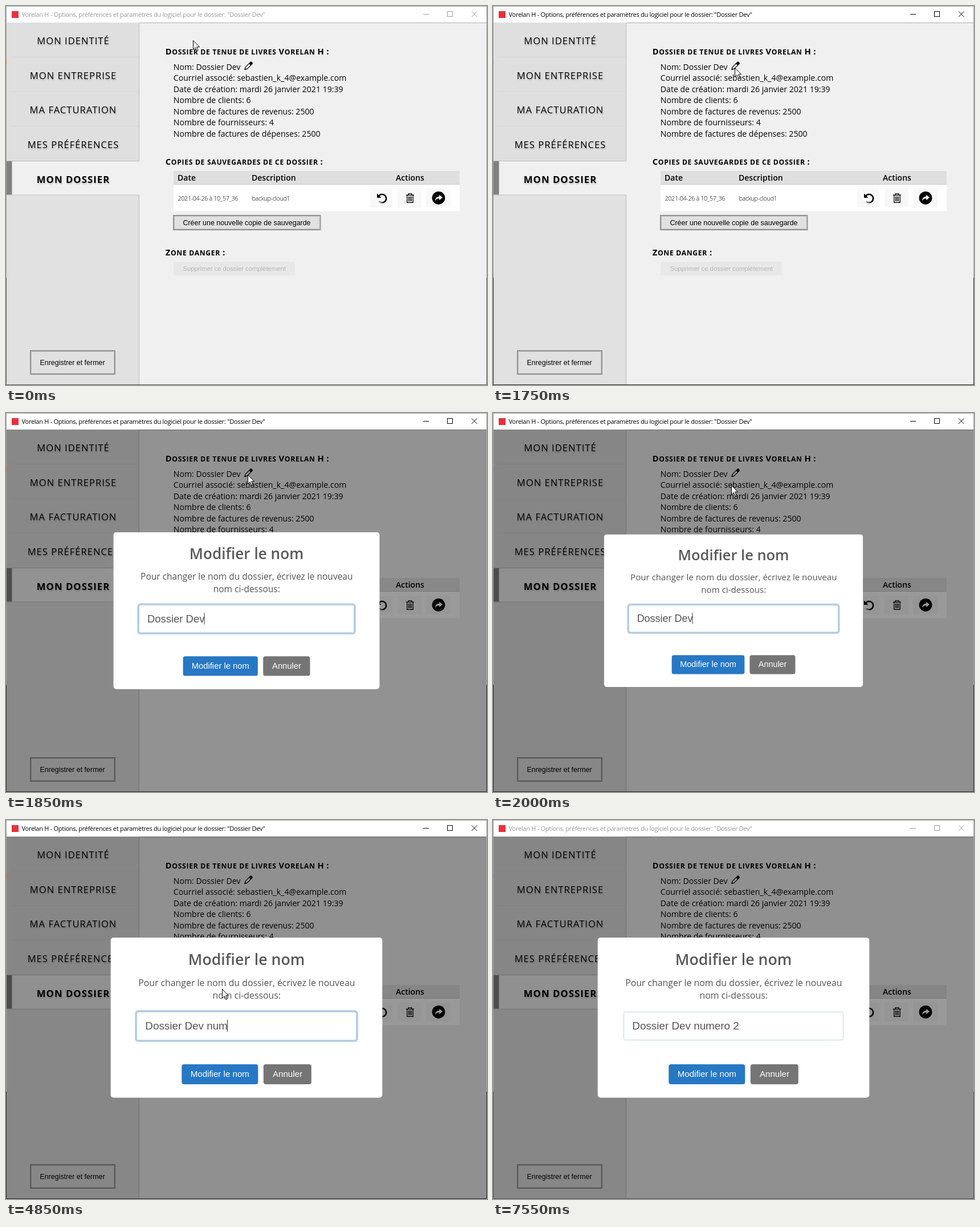
These frames come from a looping animation (844x664 px, 7.6 s). An HTML page:

```html
<!DOCTYPE html>
<html lang="fr">
<head>
<meta charset="utf-8">
<title>Options du dossier</title>
<style>
html, body { margin: 0; width: 100%; height: 100%; overflow: hidden; background: #f0f0f0; }
svg { display: block; }
text { font-family: "Open Sans", "Noto Sans", sans-serif; fill: #000; }
.bar { font-size: 11px; letter-spacing: -.27px; fill: var(--ink); }
.ctl { stroke: var(--ink); fill: none; }
.nav text { font-size: 16.6px; letter-spacing: 1px; text-anchor: middle; filter: drop-shadow(1px 2px 1px #0003); }
.nav .on { font-size: 16.8px; font-weight: 700; }
.head { font-size: 12.2px; font-weight: 700; letter-spacing: .67px; text-transform: uppercase; }
.cap { font-size: 14.8px; }
.info { font-size: 14.1px; }
.th { font-size: 14px; font-weight: 600; }
.td { font-size: 10.8px; font-weight: 300; letter-spacing: -.37px; }
.btn, .off, .ok, .field { font-family: "Liberation Sans", Arial, sans-serif; }
.btn { font-size: 12.44px; }
.off { font-size: 11.28px; fill: #b6b6b6; }
.ok { font-size: 15.1px; fill: #fff; text-anchor: middle; }
.field { font-size: 18.85px; fill: #545454; white-space: pre; }
.ask { font-size: 15.85px; fill: #545454; text-anchor: middle; }
.ttl { font-size: 26.7px; font-weight: 600; fill: #595959; text-anchor: middle; }
#modal { transform-origin: 422px 346.5px; }
</style>
</head>
<body>
<svg id="stage" width="844" height="664" viewBox="0 0 844 664">
  <defs>
    <linearGradient id="fade" gradientUnits="userSpaceOnUse" x1="653" y1="345" x2="660" y2="340">
      <stop offset="0" stop-color="#000" stop-opacity=".1"/><stop offset="1"/>
    </linearGradient>
  </defs>

  <!-- window and title bar -->
  <rect width="844" height="664" fill="#f0f0f0"/>
  <rect width="844" height="29" fill="#fff"/>
  <rect x="10" y="9" width="12" height="12" fill="#e8303c"/>
  <text class="bar" x="27.5" y="18.5">Vorelan H - Options, préférences et paramètres du logiciel pour le dossier: "Dossier Dev"</text>
  <path class="ctl" d="M732 14.5H742M774.5 9.5H783.5V18.5H774.5ZM817 9.5L826.5 19M826.5 9.5L817 19"/>

  <!-- side menu -->
  <rect x="1" y="29" width="232" height="634" fill="#e1e1e1"/>
  <rect x="1" y="29" width="232" height="242" fill="#dfdfdf"/>
  <path d="M8 89.5H232M8 150H232M8 210.5H232" stroke="#d5d5d5"/>
  <path d="M233.5 30V271.5H1M1 331H233.5V663" fill="none" stroke="#b9b9b9"/>
  <path d="M234 29.5H843" stroke="#acacac"/>
  <rect x="1" y="272" width="234" height="58.5" fill="#f0f0f0"/>
  <rect x="1" y="272" width="9.5" height="58.5" fill="#808080"/>
  <g class="nav">
    <text x="118" y="67">MON IDENTITÉ</text>
    <text x="118" y="127.5">MON ENTREPRISE</text>
    <text x="118" y="188">MA FACTURATION</text>
    <text x="118" y="248.5">MES PRÉFÉRENCES</text>
    <text class="on" x="118" y="310">MON DOSSIER</text>
  </g>
  <rect x="43" y="604" width="148" height="41" fill="#e1e1e1" stroke="#939393" stroke-width="2"/>
  <rect x="44.5" y="605.5" width="145" height="38" fill="none" stroke="#c4c4c4"/>
  <text class="btn" x="59.5" y="628.5">Enregistrer et fermer</text>

  <!-- folder page -->
  <g id="page"></g>
  <path d="M418.9 111.4L420.1 107.1 428.6 98.6Q429.8 97.4 431 98.6L431.7 99.3Q432.9 100.5 431.7 101.7L423.2 110.2ZM426.6 100.6L429.8 103.8" fill="none" stroke="#000" stroke-width="1.2" stroke-linejoin="round"/>
  <path d="M418.3 112L419.5 108.6 421.8 110.9ZM427 100.2L429.5 97.8Q430.3 97.4 431.5 98.6T432.4 100.8L430 103.2Z"/>

  <rect x="294" y="289" width="502" height="24" fill="#dfdfdf"/>
  <path d="M294 312.5H796" stroke="#c9c9c9"/>
  <rect x="294" y="313" width="502" height="46.5" fill="#fff"/>
  <text class="th" x="301" y="306">Date</text>
  <text class="th" x="431" y="306">Description</text>
  <text class="th" x="684" y="306">Actions</text>
  <text class="td" x="301.5" y="340.5">2021-04-26 à 10_57_36</text>
  <text class="td" x="431.5" y="340.5">backup-cloud1</text>
  <g fill="#f8f8f8">
    <rect x="639" y="319.5" width="39" height="33.5" rx="3"/>
    <rect x="687" y="319.5" width="42" height="33.5" rx="3"/>
    <rect x="737" y="319.5" width="43" height="33.5" rx="3"/>
  </g>
  <path d="M653.8 333.2A7.3 7.3 0 1 1 654.6 342.3" fill="none" stroke="url(#fade)" stroke-width="2.6"/>
  <path d="M651 328.5V336H658.5Z"/>
  <path d="M702 331.2H716M706.2 331V328.6H711.8V331M703.8 331V344.3H714.2V331M706.6 333.5V342M709 333.5V342M711.4 333.5V342" fill="none" stroke="#111" stroke-width="1.4"/>
  <circle cx="759" cy="336.3" r="11.4"/>
  <path d="M753 341.5C753.3 336.5 756 334 760.2 333.8V330.8L766 335.6 760.2 340.2V337.2C757 337.1 754.8 338.4 753 341.5Z" fill="#fff"/>

  <rect x="294" y="367" width="257.5" height="25" fill="#e1e1e1" stroke="#939393" stroke-width="2"/>
  <rect x="295.5" y="368.5" width="254.5" height="22" fill="none" stroke="#c4c4c4"/>
  <text class="btn" x="310.5" y="384">Créer une nouvelle copie de sauvegarde</text>
  <rect x="294" y="448" width="213" height="24" rx="3" fill="#e8e8e8"/>
  <text class="off" x="310.5" y="464">Supprimer ce dossier complètement</text>

  <!-- dialog -->
  <rect id="shade" x="0" y="29" width="844" height="635" opacity="0" fill="#000"/>
  <g id="modal">
    <rect x="183.7" y="206" width="476.6" height="280.5" rx="5" fill="#fff"/>
    <text class="ttl" x="422" y="254">Modifier le nom</text>
    <text class="ask" x="422.3" y="290.7">Pour changer le nom du dossier, écrivez le nouveau</text>
    <text class="ask" x="422.3" y="313">nom ci-dessous:</text>
    <rect id="ring" x="228" y="335" width="388" height="52" rx="4" fill="none" stroke="#b1cae3" stroke-width="3.4"/>
    <rect x="229.5" y="336.5" width="385" height="49" rx="3" fill="#fff" stroke="#b7d6e4"/>
    <text id="field" class="field" x="244.3" y="367"></text>
    <rect id="caret" y="350" width="1" height="21" fill="#333"/>
    <rect x="308.3" y="428" width="134" height="35" rx="4" fill="#2778c4"/>
    <rect id="hover" x="307.5" y="427" width="135.5" height="36.5" rx="4" fill="#236cb0" stroke="#1f609e"/>
    <text class="ok" x="375.3" y="450">Modifier le nom</text>
    <rect x="451.8" y="428" width="84" height="35" rx="4" fill="#757575"/>
    <text class="ok" x="494" y="450">Annuler</text>
  </g>

  <!-- window edges -->
  <path d="M0 .5H844M.5 0V476M843.5 0V476" stroke="#a6a6a6"/>
  <path d="M.5 476V663.5H843.5V476" fill="none" stroke="var(--edge)"/>
  <path d="M.5 95V102" stroke="#d98a3c"/>

  <g id="mouse" fill="#fff" stroke="#000">
    <path id="arrow" d="M.5 .5V16.2L4.1 12.8 6.7 18.6 9.1 17.5 6.6 11.8H11.6Z"/>
    <path id="hand" d="M-1.6 13V1.6a1.5 1.5 0 0 1 3 0V7.5c0-1.6 3-1.6 3 0v1c0-1.6 2.8-1.5 2.8 0v1c0-1.5 2.7-1.3 2.7.3v5c0 1.7-1.6 3.4-1.6 6.2h-8c0-2.4-2.6-4.4-4.6-8.6c-1-2 .7-3.4 2.7.6z"/>
  </g>
</svg>
<script>
const LOOP = 7600, STEP = 50;
const $ = id => document.getElementById(id);

// page text
const heads = [
  [84.5, 'Dossier de tenue de livres Vorelan H :'],
  [277.5, 'Copies de sauvegardes de ce dossier :'],
  [437, 'Zone danger :']
];
const info = [
  'Nom: Dossier Dev',
  'Courriel associé: sebastien_k_4@example.com',
  'Date de création: mardi 26 janvier 2021 19:39',
  'Nombre de clients: 6',
  'Nombre de factures de revenus: 2500',
  'Nombre de fournisseurs: 4',
  'Nombre de factures de dépenses: 2500'
];
const bigCaps = s => s.replace(/[A-Z:]/g, c => `<tspan class="cap">${c}</tspan>`);
$('page').innerHTML =
  heads.map(([y, s]) => `<text class="head" x="279.7" y="${y}">${bigCaps(s)}</text>`).join('') +
  info.map((s, i) => `<text class="info" x="293.8" y="${111.6 + 19.55 * i}">${s}</text>`).join('');

// eased motion, driven by the clock
const tracks = [];
function track(el, rows) {
  const frames = rows.map(([ms, props]) => ({ offset: ms / LOOP, ...props }));
  const a = el.animate(frames, { duration: LOOP, fill: 'both' });
  a.pause();
  tracks.push(a);
}
const scale = (k, easing = 'ease') => ({ transform: `scale(${k})`, easing });
const OPEN = 1783;
track($('modal'), [
  [0, scale(.7)], [OPEN, scale(.7)], [OPEN + 135, scale(1.05)],
  [OPEN + 240, scale(.95)], [OPEN + 300, scale(1)], [LOOP, scale(1)]
]);
track($('shade'), [
  [0, { opacity: 0 }], [OPEN, { opacity: 0, easing: 'ease' }],
  [OPEN + 80, { opacity: .4 }], [LOOP, { opacity: .4 }]
]);
track($('ring'), [
  [0, { opacity: 1 }], [7450, { opacity: 1 }], [7550, { opacity: 0 }], [LOOP, { opacity: 0 }]
]);
const path = [
  [0, 328, 60], [300, 306, 107], [400, 306, 107], [1100, 424, 110], [1200, 424, 110],
  [1250, 424, 109], [1650, 424, 109], [1700, 424, 108], [1950, 424, 108],
  [2450, 364, 293], [2650, 379, 296], [5800, 379, 296], [5950, 393, 432],
  [6000, 394, 436], [6100, 397, 441], [6450, 395, 440], [6650, 395, 440],
  [6950, 225, 570], [LOOP, 225, 570]
];
track($('mouse'), path.map(([ms, x, y]) => [ms, { transform: `translate(${x}px, ${y}px)` }]));

// on/off spans
const spans = {
  modal: [[OPEN, LOOP]],
  caret: [[1800, 2350], [2850, 3350], [3400, 3950], [4500, 5900], [6400, 6900]],
  hover: [[5950, 6750]],
  hand: [[1100, 1700], [5950, 6750]],
  arrow: [[0, 1100], [1700, 5950], [6750, 7000]]
};
const within = (t, list) => list.some(([a, b]) => t >= a && t < b);

// typing
const START = 'Dossier Dev', ADDED = ' numero 2';
const keys = [3400, 4550, 4650, 4850, 4950, 5050, 5100, 5250, 5400];
const pen = document.createElement('canvas').getContext('2d');
pen.font = '18.85px "Liberation Sans", Arial, sans-serif';

function draw(t) {
  tracks.forEach(a => a.currentTime = t);
  for (const id in spans) $(id).style.display = within(t, spans[id]) ? '' : 'none';
  const typed = START + ADDED.slice(0, keys.filter(k => k <= t).length);
  $('field').textContent = typed;
  $('caret').setAttribute('x', Math.floor(244.3 + pen.measureText(typed).width));
  const active = t >= 1700 && t < 7500;
  $('stage').style.setProperty('--ink', active ? '#000' : '#999');
  $('stage').style.setProperty('--edge', active ? '#2b2b2b' : '#555');
}

const t0 = performance.now();
function tick() {
  const t = (performance.now() - t0) % LOOP;
  draw(Math.floor(t / STEP) * STEP);
  requestAnimationFrame(tick);
}
tick();
</script>
</body>
</html>
```
